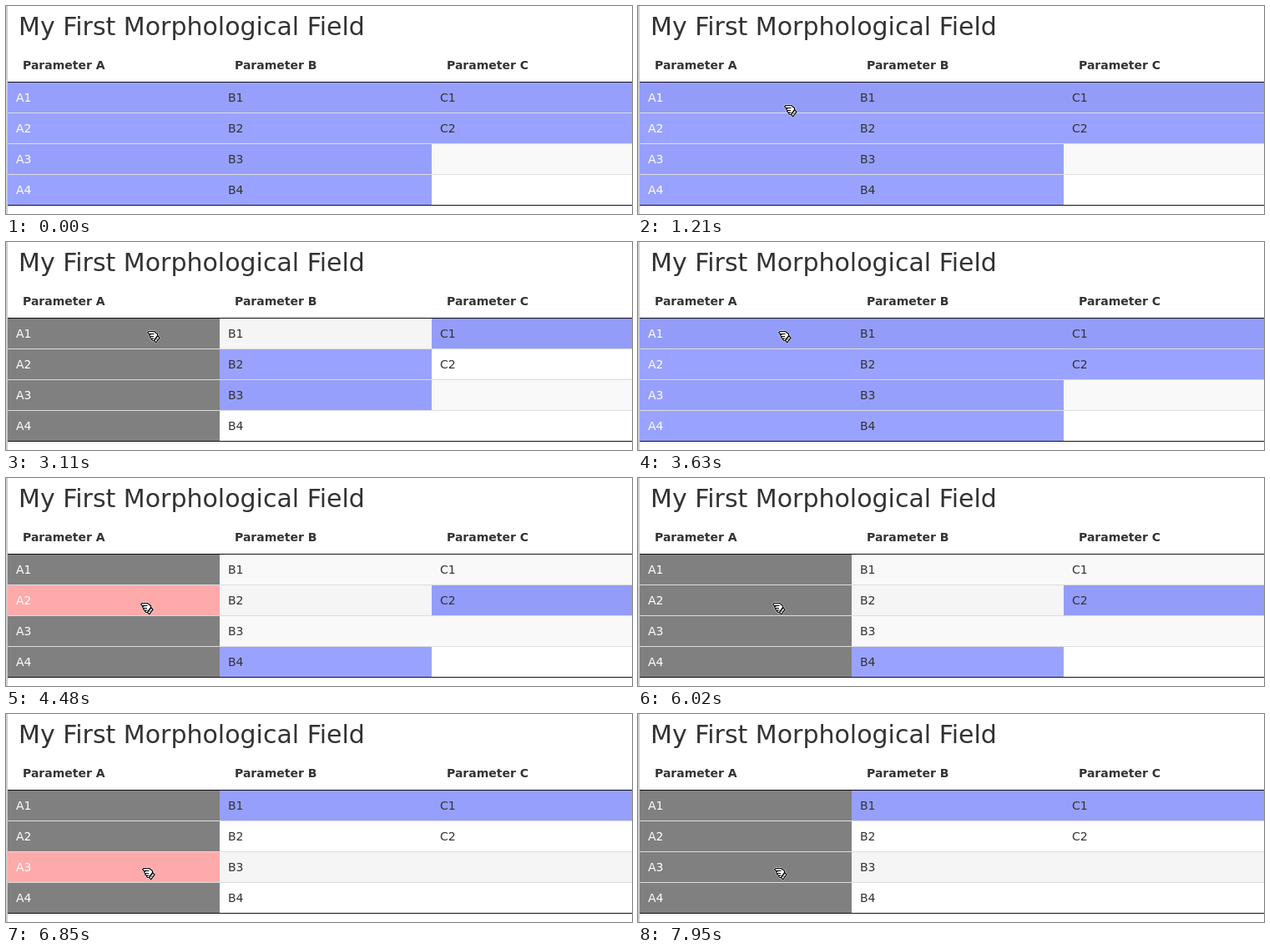
Recreate the animation shown at these times as an HTML page. Size 750 by 250 pixels, loop 8000 ms.

```html
<!DOCTYPE html>
<html lang="en">
<head>
<meta charset="utf-8">
<title>Morphological Field</title>
<style>
  html, body { margin: 0; width: 100%; height: 100%; overflow: hidden; background: #fff; }
  svg { display: block; width: 750px; height: 250px; font: 14px "DejaVu Sans", sans-serif; }
</style>
</head>
<body>
<svg id="stage" viewBox="0 0 750 250">
  <rect width="750" height="250" fill="#fff"/>
  <rect width="2" height="250" fill="#ccc"/>
  <text x="15" y="35" font-size="30" fill="#333">My First Morphological Field</text>
  <g id="table"></g>
  <g id="hand" stroke-linejoin="round">
    <path id="halo" fill="#fff" stroke="#fff" stroke-width="2"/>
    <path id="outline" fill="#fff" stroke="#000" stroke-width="1.2"/>
    <path d="M6 4.5h2.5M4.5 7.5H8M6 10H8.5" fill="none" stroke="#000"/>
    <path d="M12.5 7L8.8 12" stroke="#000" stroke-width="1.6"/>
    <path d="M13.2 9.6l-2.4 3" stroke="#000" stroke-dasharray="1 1"/>
  </g>
</svg>
<script>
const LOOP = 8000, TOP = 92, PITCH = 37, LEFT = 2, COL = 254;
const BLUE = 'rgba(0,25,255,.4)', PINK = '#ffaaaa', GREY = '#808080';
const columns = [['A1', 'A2', 'A3', 'A4'], ['B1', 'B2', 'B3', 'B4'], ['C1', 'C2']];
const matches = { A1: ['B2', 'B3', 'C1'], A2: ['B4', 'C2'], A3: ['B1', 'C1'] };

// [from, released, to, chosen cell]
const picks = [
  [1850, 3110, 3200, 'A1'],
  [4480, 6020, 6070, 'A2'],
  [6810, 7950, 8000, 'A3']
];

// Cursor strokes, drawn in discrete steps; bend is the control height of the arc
const moves = [
  { start: 820, end: 1250, steps: 10, from: [728, 162], to: [169, 119], bend: 61, ease: p => 1 - (1 - p) ** 2 },
  { start: 1430, end: 1510, steps: 2, from: [169, 116], to: [169, 106] },
  { start: 3630, end: 4150, steps: 12, from: [168, 106], to: [161, 149] },
  { start: 6070, end: 6470, steps: 8, from: [161, 149], to: [163, 184] }
];

const NS = 'http://www.w3.org/2000/svg';
const table = document.getElementById('table');
const hand = document.getElementById('hand');
const shape = 'M.6 2.6L2 1.5H8.5L12.5 4.5V6.5L15.2 9.2L10.7 14.8L8.5 12.5H6.5L5.5 11L6 10H4.5L3.5 8.5L4.5 7.5H3.5L2.5 6L3.5 5L6 4.5H2Z';
for (const id of ['halo', 'outline']) document.getElementById(id).setAttribute('d', shape);

function add(tag, attrs, text) {
  const el = document.createElementNS(NS, tag);
  for (const k in attrs) el.setAttribute(k, attrs[k]);
  if (text) el.textContent = text;
  return table.appendChild(el);
}
const box = (x, y, width, height, fill) => add('rect', { x, y, width, height, fill });

const rows = [], cells = [];
for (let r = 0; r < 4; r++) {
  const y = TOP + r * PITCH;
  rows.push(box(LEFT, y, 748, 36, '#fff'));
  columns.forEach((names, c) => {
    const name = names[r], x = LEFT + c * COL;
    if (!name) return;
    cells.push({ name, first: c === 0, el: box(x, y, COL, 36, BLUE) });
    add('text', { x: x + 10, y: y + 23, fill: c ? '#333' : '#fff' }, name);
  });
  if (r < 3) box(LEFT, y + 36, 748, 1, '#ddd');
}
for (const y of [91, 239]) box(LEFT, y, 748, 1, '#111');
['A', 'B', 'C'].forEach((n, c) =>
  add('text', { x: LEFT + 18 + c * COL, y: 76, fill: '#333', 'font-weight': 'bold' }, 'Parameter ' + n));

const smooth = p => p * p * (3 - 2 * p);

function cursorAt(t) {
  const m = moves.filter(m => t >= m.start).pop();
  if (!m) return null;
  const step = Math.floor((t - m.start) / (m.end - m.start) * m.steps + 1e-6);
  const p = (m.ease || smooth)(Math.min(1, step / m.steps)), q = 1 - p;
  const [x0, y0] = m.from, [x1, y1] = m.to;
  const bend = m.bend ?? (y0 + y1) / 2;
  return [Math.round(x0 * q + x1 * p), Math.round(y0 * q * q + 2 * bend * p * q + y1 * p * p)];
}

function cellFill(cell, pick, t) {
  if (!pick) return BLUE;
  const [, released, , chosen] = pick;
  if (cell.first) return cell.name === chosen && t < released ? PINK : GREY;
  return matches[chosen].includes(cell.name) ? BLUE : 'none';
}

function draw(t) {
  const pos = cursorAt(t);
  const hover = pos ? Math.floor((pos[1] - TOP) / PITCH) : -1;
  const pick = picks.find(([from, , to]) => t >= from && t < to);
  rows.forEach((el, r) => el.setAttribute('fill', r === hover ? '#f5f5f5' : r % 2 ? '#fff' : '#f9f9f9'));
  for (const cell of cells) cell.el.setAttribute('fill', cellFill(cell, pick, t));
  hand.setAttribute('visibility', pos ? 'visible' : 'hidden');
  if (pos) hand.setAttribute('transform', `translate(${pos})`);
}

const began = performance.now();
function tick() {
  draw((performance.now() - began) % LOOP);
  requestAnimationFrame(tick);
}
draw(0);
requestAnimationFrame(tick);
</script>
</body>
</html>
```
